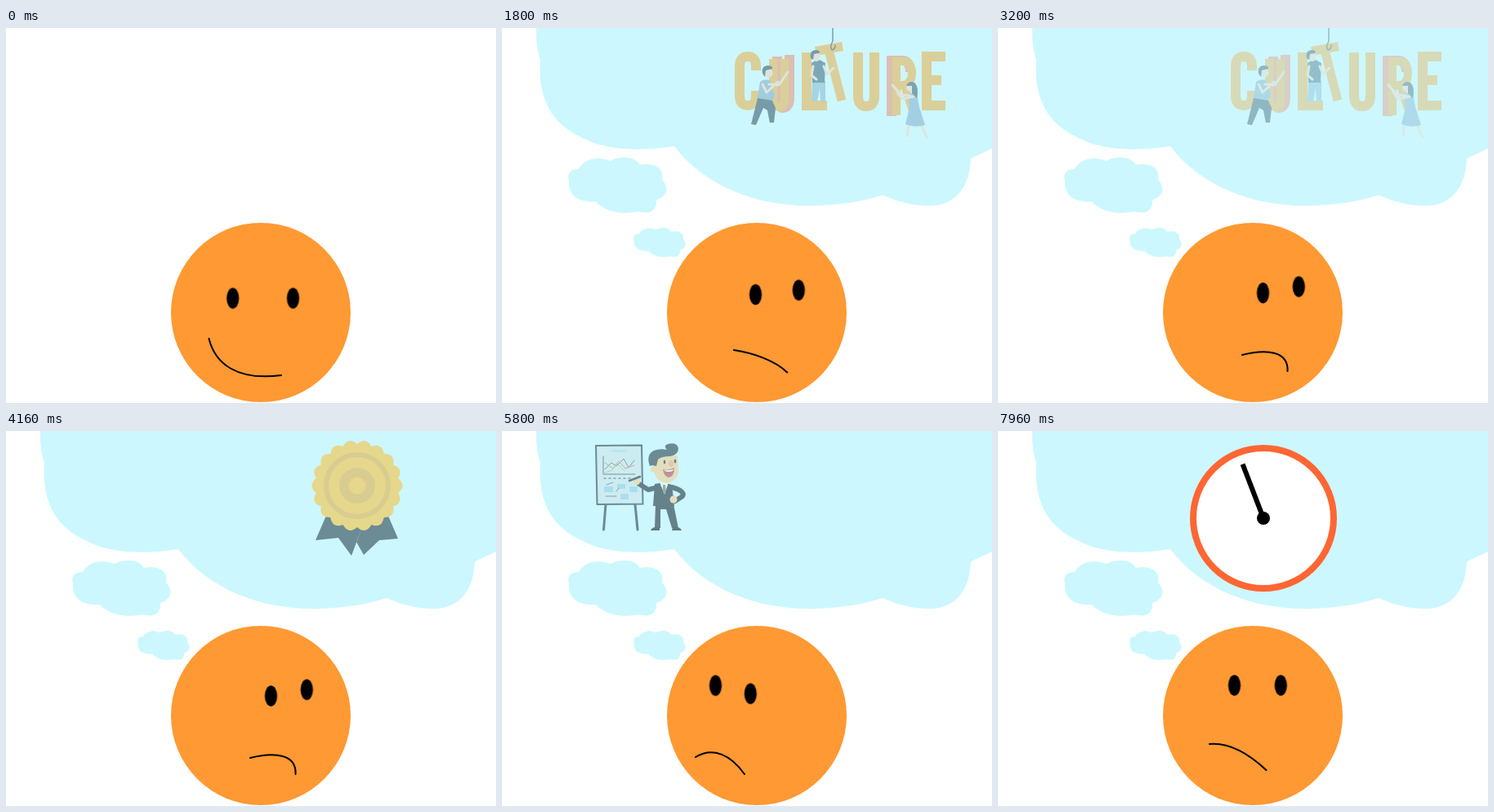
An HTML page for the animation above (8 s loop, 600x460 px).

```html
<!DOCTYPE html>
<html lang="en">
<head>
<meta charset="utf-8">
<title>Worried face</title>
<style>
html, body { margin: 0; width: 600px; height: 460px; overflow: hidden; background: #fff; }
svg { display: block; }

/* One loop is 8 s, so 0.5% is one 40 ms step. */
.anim { animation: 8s linear infinite; }
.cloud { fill: #ccf7ff; animation-timing-function: step-end; }
#puff1 { animation-name: puff1; }
#puff2 { animation-name: puff2; }
#puff3 { animation-name: puff3; }
#word { animation-name: word; }
#badge { animation-name: badge; }
#talk { animation-name: talk; }
#clock { animation-name: clock; }
#hand { animation-name: hand; transform-origin: 325px 107px; }
#eyeL { animation-name: eyeL; }
#eyeR { animation-name: eyeR; }
#mouth { animation-name: mouth; fill: none; stroke: #000; stroke-width: 2; stroke-linecap: round; }

@keyframes puff1 { 0% { opacity: 0 } 3%, 100% { opacity: 1 } }
@keyframes puff2 { 0% { opacity: 0 } 9%, 100% { opacity: 1 } }
@keyframes puff3 { 0% { opacity: 0 } 14%, 100% { opacity: 1 } }

@keyframes word {
  0%, 19.5% { opacity: 0; animation-timing-function: steps(16, start) }
  27.5%, 36% { opacity: 1; animation-timing-function: steps(13, start) }
  42.5%, 100% { opacity: 0 }
}
@keyframes badge {
  0%, 48% { opacity: 0; animation-timing-function: steps(15, start) }
  55.5%, 60% { opacity: 1; animation-timing-function: steps(13, start) }
  66.5%, 100% { opacity: 0 }
}
@keyframes talk {
  0%, 68.5% { opacity: 0; animation-timing-function: steps(16, start) }
  76.5%, 82.5% { opacity: 1; animation-timing-function: steps(11, start) }
  88%, 100% { opacity: 0 }
}
@keyframes clock {
  0%, 92.49% { opacity: 0 }
  92.5% { opacity: .15; animation-timing-function: steps(14) }
  99.5%, 100% { opacity: 1 }
}
@keyframes hand {
  0%, 92.5% { transform: rotate(27deg); animation-timing-function: steps(14) }
  99.5%, 100% { transform: rotate(339deg) }
}

@keyframes eyeL {
  0%, 19.5% { transform: translate(277.7px, 331.5px); animation-timing-function: steps(10, start) }
  24.5%, 66% { transform: translate(324.5px, 325px); animation-timing-function: steps(10, start) }
  71%, 92.5% { transform: translate(261.5px, 312.2px); animation-timing-function: steps(11, start) }
  98%, 100% { transform: translate(289.5px, 312px) }
}
@keyframes eyeR {
  0%, 19.5% { transform: translate(351.5px, 331.5px); animation-timing-function: steps(10, start) }
  24.5%, 66% { transform: translate(368.3px, 317.3px); animation-timing-function: steps(10, start) }
  71%, 92.5% { transform: translate(304.3px, 322.2px); animation-timing-function: steps(11, start) }
  98%, 100% { transform: translate(346.3px, 312px) }
}
@keyframes mouth {
  0%, 19.5% { d: path("M248.5 381C256 412 283 433 337 426"); animation-timing-function: steps(10, start) }
  24.5%, 66% { d: path("M299 401C330 393 356 397 354.5 421"); animation-timing-function: steps(10, start) }
  71%, 92.5% { d: path("M237 400C258 387 280 397 297 421"); animation-timing-function: steps(11, start) }
  98%, 100% { d: path("M259 384C281 382 305 394 328.5 416") }
}

.line { fill: none; stroke-linecap: round; stroke-linejoin: round; }
.letter { fill: none; stroke: #f09c18; stroke-width: 12; }
.side { fill: none; stroke: #f07850; stroke-width: 12; }
</style>
</head>
<body>
<svg width="600" height="460" viewBox="0 0 600 460">
  <defs>
    <path id="puff" d="M82 188C79 178 84 173 94 173C101 160 118 157 133 163C146 156 163 158 169 168C186 164 199 172 196 186C204 194 204 206 189 211C190 224 181 229 167 225C148 229 128 227 115 213C96 214 81 208 82 188Z"/>
  </defs>

  <g class="anim cloud" id="puff1"><use href="#puff" transform="translate(118.15 160.9) scale(.529)"/></g>
  <g class="anim cloud" id="puff2"><use href="#puff"/></g>
  <path class="anim cloud" id="puff3" d="M42 0Q41 22 47 39C44 80 56 112 91 131C122 150 165 152 211 145C245 190 305 218 376 218C410 218 440 213 466 205C492 216 515 220 535 217C562 211 573 188 574 160L600 148V0Z"/>

  <g class="anim" id="word">
    <g class="side">
      <path d="M337 35V84Q338 98 344 98Q352 97 352 85V33"/>
      <path d="M477 108V40H492Q500 42 500 54"/>
    </g>
    <g class="letter">
      <path d="M311 52V47Q311 35 301 35Q291 35 291 47V83Q291 95 301 95Q311 95 311 83V77"/>
      <path d="M332 38V85Q332 97 340 97Q346 97 346 86V38" stroke-width="10"/>
      <path d="M373 30V95H398"/>
      <path d="M384 28.500L417 22.500M400 27L416 89" stroke-width="11"/>
      <path d="M436 30V83Q436 96 446 96Q456 96 456 83V30"/>
      <path d="M483 107V41H491Q502 41 502 55Q502 69 491 70H483M493 71L503 102" stroke-width="10"/>
      <path d="M543 35H520V95H543M520 64H538"/>
    </g>
    <path class="line" d="M405 0V16Q401 23 404 27Q408 26 408 21" stroke="#15303c" stroke-width="1.500"/>

    <path d="M314 82L305 118L311 119L320 98L325 101L328 117L333 116L335 98L330 87Z" fill="#08283c"/>
    <path d="M316 66Q321 62 328 64L334 83L331 89L313 86Z" fill="#6898b4"/>
    <path class="line" d="M327 69L339 70L350 54M319 69L324 79L338 66" stroke="#f6cdb0" stroke-width="3"/>
    <circle cx="326" cy="55" r="5.500" fill="#f6cdb0"/>
    <path d="M319 56Q317 47 325 46Q332 46 331 50L323 52L322 60Z" fill="#08283c"/>
    <path class="line" d="M304 119L310 121M328 117L334 118" stroke="#f7eee8" stroke-width="2"/>

    <path d="M380 65H396V90H390L389 74L386 90H379Z" fill="#76a7c3"/>
    <path d="M379 43L387 38L396 43L395 67H380Z" fill="#15445a"/>
    <path class="line" d="M394 47L398 57L406 49M381 47L379 58L385 63" stroke="#f6cdb0" stroke-width="3"/>
    <ellipse cx="385" cy="35" rx="5" ry="6" fill="#f6cdb0"/>
    <path d="M378 37Q376 26 386 27Q391 29 388 31L382 32L381 39Z" fill="#08283c"/>

    <path class="line" d="M498 116L496 133M513 117L520 135" stroke="#f6cdb0" stroke-width="3"/>
    <path d="M497 81L508 79L511 97L518 119Q506 123 494 118L499 98Z" fill="#6c9cbf"/>
    <path class="line" d="M500 83L489 82L478 70M504 84L490 87L484 79" stroke="#f6cdb0" stroke-width="3"/>
    <circle cx="500" cy="73" r="5" fill="#f6cdb0"/>
    <path d="M495 71Q498 64 505 67Q511 72 508 86L502 80L502 71Z" fill="#15384c"/>
    <path class="line" d="M494 134L499 135M517 136L522 137" stroke="#f7eee8" stroke-width="2"/>
  </g>

  <g class="anim" id="badge">
    <path d="M392 104L379 134L407 131L423 153L436 118ZM468 104L480 132L457 134L438 152L429 136L436 118Z" fill="#2c4550"/>
    <path id="seal" fill="#f7c23f"/>
    <circle cx="430" cy="67" r="38" fill="none" stroke="#e3b148" stroke-width="6"/>
    <circle cx="430" cy="67" r="22" fill="#e3b148"/>
    <circle cx="430" cy="67" r="10.500" fill="#f7c23f"/>
  </g>

  <g class="anim" id="talk">
    <path class="line" d="M127 90L124.500 121M163 90L166 121" stroke="#1b3843" stroke-width="3"/>
    <path d="M115 18L171 17.500L172.500 89.500L116.500 90Z" fill="#cee2e6" stroke="#1b3843" stroke-width="2"/>
    <path d="M134 23H153V26H134Z" fill="#a4dcec"/>
    <path class="line" d="M124 31V53H163" stroke="#304850"/>
    <path class="line" d="M126 47L134 39L140 43L149 34L155 45L162 36" stroke="#48626c"/>
    <path class="line" d="M126 39L136 46L143 37L151 46L162 42" stroke="#bf756d"/>
    <path class="line" d="M126 51L135 48L141 40L150 49" stroke="#c0ad5a"/>
    <path class="line" d="M125 58H161" stroke="#4d656e" stroke-width="1.500" stroke-dasharray="2 4"/>
    <path d="M125 68H136V75H125ZM141 65H151V71H141ZM156 68H166V75H156ZM145 77H155V84H145Z" fill="#8fc9e2"/>
    <path class="line" d="M128 66L136 63M127 80H140M140 74L143 70" stroke="#48626c"/>

    <path d="M188 90H210L216 119H208L201 96H194V119H187Z" fill="#142630"/>
    <path d="M182 122Q184 117 193 118V122ZM208 122L209 118Q218 117 220 122Z" fill="#0c1820"/>
    <path class="line" d="M191 69L179 72L168 65" stroke="#142630" stroke-width="6"/>
    <path class="line" d="M208 69Q225 74 221 80L212 86" stroke="#142630" stroke-width="6"/>
    <path d="M187 65L198 63L208 66L211 92H185Z" fill="#142630"/>
    <path d="M193 63H204L199 78Z" fill="#eef4f4"/>
    <path d="M197 66H200L201 74L199 78L197 74Z" fill="#5c7f58"/>
    <circle cx="165" cy="62" r="4" fill="#f5c98c"/>
    <path class="line" d="M156 61L169 56" stroke="#142630" stroke-width="2.500"/>
    <circle cx="210" cy="84" r="4.500" fill="#f5c98c"/>
    <path d="M187 36Q200 26 215 31L216 51Q213 63 201 64Q188 62 186 48Z" fill="#f5c98c"/>
    <circle cx="186" cy="47" r="4" fill="#f5c98c"/>
    <path d="M181 43Q176 29 186 24Q194 21 202 23Q197 18 203 16Q214 13 216 21Q216 29 206 31Q195 31 191 35L189 43L184 42Z" fill="#203740"/>
    <path d="M197 47Q204 49 211 45Q211 56 204 57Q198 55 197 47Z" fill="#b84040"/>
    <path d="M199 48Q204 49 210 47L209 49Q204 51 199 49Z" fill="#fff"/>
    <ellipse cx="199" cy="38" rx="1.300" ry="2.500" fill="#142630"/>
    <ellipse cx="212" cy="37" rx="1.300" ry="2.500" fill="#142630"/>
    <ellipse cx="207" cy="40" rx="3" ry="4" fill="#e6a679"/>
  </g>

  <g class="anim" id="clock">
    <circle cx="325" cy="107" r="86" fill="#fff" stroke="#f63" stroke-width="8"/>
    <path class="anim" id="hand" d="M325 107V36" stroke="#000" stroke-width="6"/>
    <circle cx="325" cy="107" r="8"/>
  </g>

  <circle cx="312" cy="349" r="110" fill="#f93"/>
  <ellipse class="anim" id="eyeL" rx="7.600" ry="12.700"/>
  <ellipse class="anim" id="eyeR" rx="7.600" ry="12.700"/>
  <path class="anim" id="mouth" d="M248.500 381C256 412 283 433 337 426"/>
</svg>
<script>
// Scalloped seal with 18 tips
const polar = (deg, r) => {
  const a = deg * Math.PI / 180;
  return `${(430 + r * Math.sin(a)).toFixed(1)} ${(67 - r * Math.cos(a)).toFixed(1)}`;
};
let d = 'M' + polar(0, 51);
for (let a = 0; a < 360; a += 20) d += `Q${polar(a + 10, 61)} ${polar(a + 20, 51)}`;
document.getElementById('seal').setAttribute('d', d + 'Z');
</script>
</body>
</html>
```
